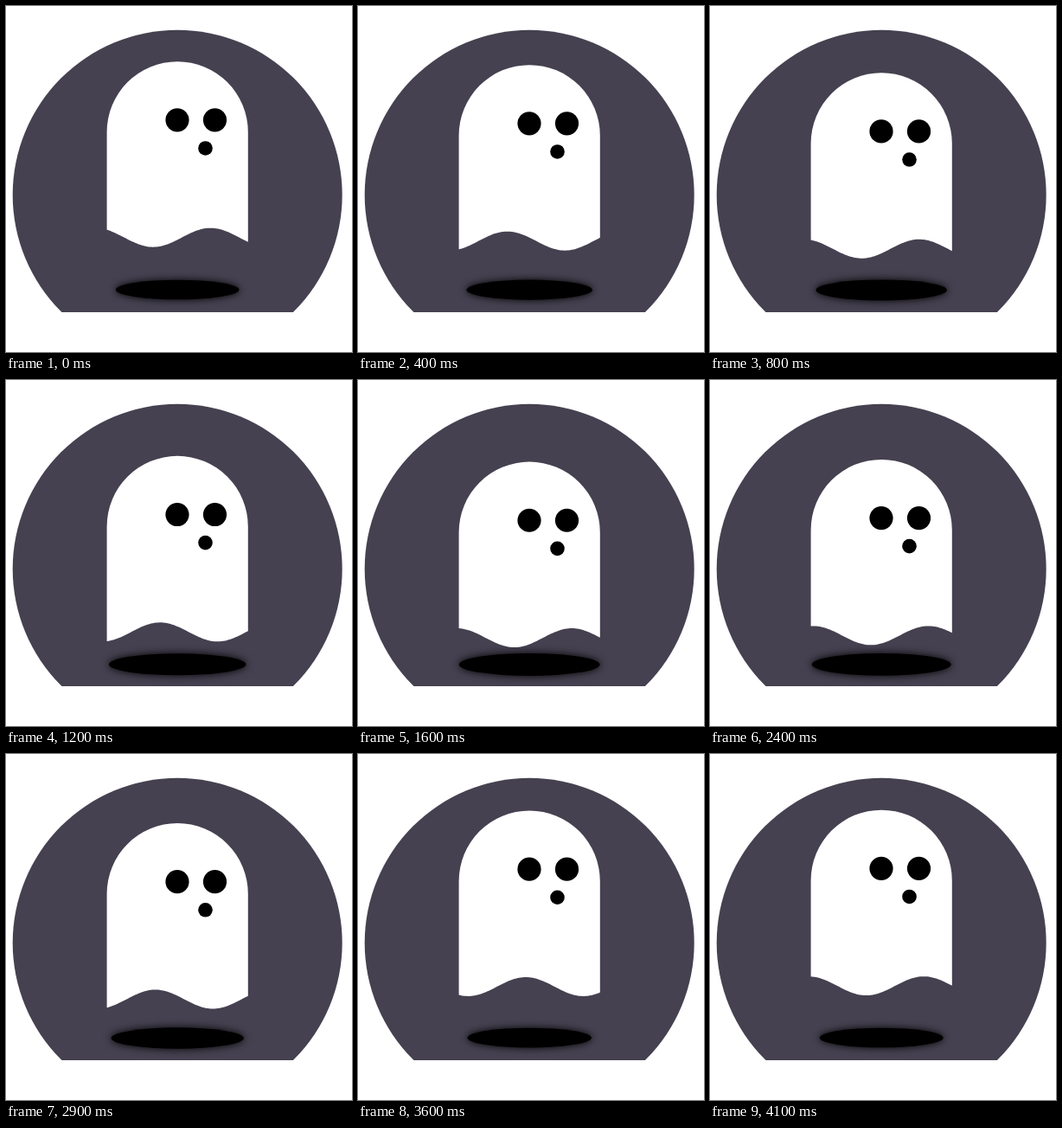
Animation of 400 by 400 pixels, one loop 4200 ms. Source, as an HTML page:

```html
<!DOCTYPE html>
<html lang="en">
<head>
<meta charset="utf-8">
<title>Floating ghost</title>
<style>
  html, body { margin: 0; height: 100%; overflow: hidden; background: #fff; }
  svg { display: block; width: 400px; height: 400px; }
  .halo { filter: blur(5px); }
</style>
</head>
<body>
<svg viewBox="0 0 400 400">
  <clipPath id="floor"><rect width="400" height="354"/></clipPath>
  <circle cx="198.2" cy="218.3" r="190.5" fill="#454150" clip-path="url(#floor)"/>
  <g id="shadow">
    <ellipse class="halo" rx="82" ry="13"/>
    <ellipse rx="82" ry="13"/>
  </g>
  <g id="ghost">
    <path id="sheet" fill="#fff"/>
    <circle cx="198" cy="67.7" r="13.6"/>
    <circle cx="241.5" cy="67.7" r="13.6"/>
    <circle cx="230.5" cy="100.3" r="8.3"/>
  </g>
</svg>
<script>
const LOOP = 4200, STEP = 100;
const BOB = 2000, BOB_START = 100;
const LEFT = 116.6, RIGHT = 279.8, RADIUS = (RIGHT - LEFT) / 2;
const WAVE = { length: 133, period: 5000 / 6, height: 11, base: 203.5, trough: 170 };

const [shadow, ghost, sheet] = ['shadow', 'ghost', 'sheet'].map(id => document.getElementById(id));

// cubic-bezier(.42, 0, .58, 1)
function easeInOut(x) {
  let lo = 0, hi = 1;
  for (let i = 0; i < 20; i++) {
    const s = (lo + hi) / 2;
    if (s * (1.26 + s * (-0.78 + s * 0.52)) < x) lo = s; else hi = s;
  }
  return lo * lo * (3 - 2 * lo);
}

// Dome on top, hem that ripples to the left
function sheetPath(t) {
  const trough = WAVE.trough - WAVE.length * t / WAVE.period;
  let d = `M${LEFT} ${RADIUS}A${RADIUS} ${RADIUS} 0 0 1 ${RIGHT} ${RADIUS}`;
  const count = 80;
  for (let i = 0; i <= count; i++) {
    const x = RIGHT + (LEFT - RIGHT) * i / count;
    const y = WAVE.base + WAVE.height * Math.cos(2 * Math.PI * (x - trough) / WAVE.length);
    d += `L${x.toFixed(2)} ${y.toFixed(2)}`;
  }
  return d + 'Z';
}

function draw(t) {
  const phase = (t + BOB_START) / BOB % 2;
  const drop = easeInOut(phase < 1 ? phase : 2 - phase);
  ghost.setAttribute('transform', `translate(0 ${64 + 32 * drop})`);
  sheet.setAttribute('d', sheetPath(t));
  shadow.setAttribute('transform', `translate(198.2 ${328 + drop}) scale(${0.87 + 0.13 * drop})`);
}

const start = performance.now();
function tick() {
  const t = (performance.now() - start) % LOOP;
  draw(Math.floor(t / STEP) * STEP);
  requestAnimationFrame(tick);
}
tick();
</script>
</body>
</html>
```
